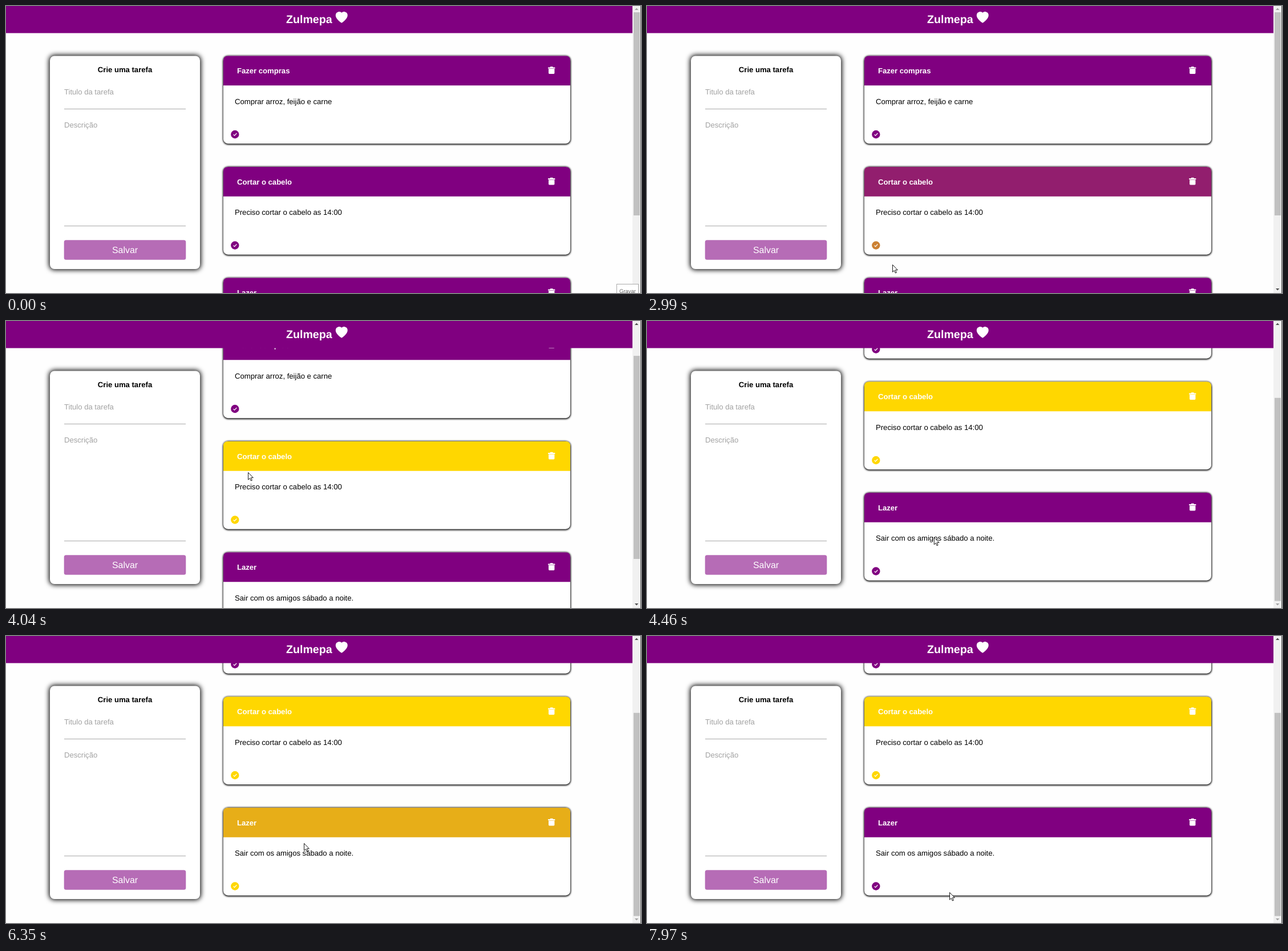
Recreate the animation shown at these times as an HTML page. Size 1113x503 px, loop 8000 ms.

```html
<!DOCTYPE html>
<html lang="pt">
<head>
<meta charset="utf-8">
<style>
  html, body { margin: 0; width: 100%; height: 100%; overflow: hidden; background: #fefefe; }
  svg { display: block; }
  text { font: 13.1px "Liberation Sans", Arial, sans-serif; text-rendering: geometricPrecision; }
  .bold { font-weight: bold; }
  .hint { fill: #a2a2a2; }
  .white { fill: #fff; }
  .glow { filter: blur(4px); }
  .shade { filter: blur(1.8px); }
</style>
</head>
<body>
<svg width="1113" height="503" viewBox="0 0 1113 503">
  <defs>
    <path id="trash" class="white" d="M950 108.3q0-.8.8-.8h2.6l.8-1.2h4l.8 1.2h2.6q.8 0 .8.8v1.1h-12.4zM951 110h10.4v7.6q0 1.4-1.4 1.4h-7.6q-1.4 0-1.4-1.4z"/>
  </defs>
  <g id="list"></g>

  <rect width="1098" height="47.5" fill="purple"/>
  <text x="491" y="30" class="bold white" style="font-size:19.6px">Zulmepa</text>
  <path class="white" transform="translate(577.8 10) scale(1.31)" d="M8 1.3C12.4-3.2 23.5 4.7 8 15-7.5 4.7 3.6-3.2 8 1.3z"/>

  <rect class="glow" x="75.5" y="86" width="266" height="376.5" rx="9"/>
  <rect class="white" x="77" y="87.5" width="263" height="373.5" rx="8"/>
  <text x="208.5" y="115.7" class="bold" text-anchor="middle">Crie uma tarefa</text>
  <text x="102" y="155" class="hint">Titulo da tarefa</text>
  <text x="102" y="212.5" class="hint">Descrição</text>
  <path d="M102 180.5H315M102 385.5H315" stroke="#a9a9a9"/>
  <rect x="101.7" y="410.2" width="213.6" height="34.5" rx="3.5" fill="#b66cb6"/>
  <text x="208.5" y="432.7" class="white" text-anchor="middle" style="font-size:15.9px">Salvar</text>

  <rect x="1098" width="14" height="503" fill="#f1f1f1"/>
  <rect x="1112" width="1" height="503" fill="#555"/>
  <rect id="thumb" x="1100" width="11" height="356" fill="#c1c1c1"/>
  <path id="up" d="M1102 7l3.2-3.5 3.2 3.5z"/>
  <path id="down" d="M1102 495l3.2 3.5 3.2-3.5z"/>

  <g id="tip">
    <rect x="1070.5" y="487.5" width="38" height="18" fill="#fff" stroke="#aaa"/>
    <text x="1075" y="502.5" fill="#666" style="font-size:9.5px">Gravar</text>
  </g>

  <g id="cursor" fill="#fff" stroke="#000" stroke-linejoin="round">
    <path id="arrow" d="M.5.5V13.2L3.4 10.5 5.3 15 7.3 14.2 5.4 9.7H9.3Z" stroke-width=".9"/>
    <path id="hand" d="M-1.5 11V2Q-1.5.5 0 .5T1.5 2V7Q3.8 5.8 4.3 7.5 6.2 6.8 6.7 8.3 8.5 8 8.5 10V13Q8.5 15.5 7 17V19H-1V17.5Q-3 15.5-4.5 12.8-6 10.5-5 9.7-3.7 9-1.5 11.5ZM1.5 7V10M4.3 7.5V10.5M6.7 8.3V10.8"/>
  </g>
</svg>
<script>
const LOOP = 8000, NOTCH = 71, MAX_SCROLL = 175.5, PITCH = 194.5;
const CHECK_X = 401.3, CHECK_Y = 225;
const $ = id => document.getElementById(id);
const set = (id, name, value) => $(id).setAttribute(name, value);

const cards = [
  ["Fazer compras", "Comprar arroz, feijão e carne"],
  ["Cortar o cabelo", "Preciso cortar o cabelo as 14:00"],
  ["Lazer", "Sair com os amigos sábado a noite."]
];
$("list").innerHTML = cards.map(([title, body], i) => `
  <g transform="translate(0 ${i * PITCH})">
    <rect class="shade" x="380.2" y="86.9" width="609.8" height="156" rx="9"/>
    <rect class="white" x="381" y="87.5" width="608" height="153.7" rx="8"/>
    <path id="head${i}" d="M381 139.2V95.5q0-8 8-8H981q8 0 8 8V139.2Z"/>
    <text x="405" y="118.3" class="bold white">${title}</text>
    <use href="#trash"/>
    <text x="401" y="171.5">${body}</text>
    <circle id="check${i}" cx="${CHECK_X}" cy="${CHECK_Y}" r="7.2"/>
    <path d="M398.5 225.2l2 2 3.8-4.2" fill="none" stroke="#fff" stroke-width="1.2"/>
  </g>`).join("");

// Eased 0 to 1 between two times.
function ramp(t, from, to) {
  const f = Math.min(1, Math.max(0, (t - from) / (to - from)));
  return f * f * (3 - 2 * f);
}
const fade = (t, from) => ramp(t, from, from + 300);

// The bend bows a move downwards at its middle.
const entry = { x: 1084, y: 478 };
const moves = [
  { from: 320, to: 1080, x: 399, y: 424, bend: -223 },
  { from: 2160, to: 2860, x: 430, y: 453 },
  { from: 3410, to: 4040, x: 424, y: 265 },
  { from: 4040, to: 4670, x: 530, y: 418 },
  { from: 4670, to: 5230, x: 402, y: 438 },
  { from: 5570, to: 6350, x: 522, y: 363, bend: 42 },
  { from: 6410, to: 7030, x: 402, y: 441 },
  { from: 7360, to: 7970, x: 530, y: 449, bend: 28 }
];

function pointerAt(t) {
  let { x, y } = entry;
  for (const m of moves) {
    const f = ramp(t, m.from, m.to);
    x += (m.x - x) * f;
    y += (m.y - y) * f + (m.bend || 0) * 4 * f * (1 - f);
  }
  return [x, y];
}

function scrollAt(t) {
  const notches = [3780, 4170, 4320].reduce((sum, at) => sum + ramp(t, at, at + 140), 0);
  return Math.min(MAX_SCROLL, NOTCH * notches);
}

function paint(i, head, check) {
  const tint = f => `rgb(${128 + 127 * f},${215 * f},${128 - 128 * f})`;
  set("head" + i, "fill", tint(head));
  set("check" + i, "fill", tint(check));
}

function draw(t) {
  const offset = scrollAt(t);
  const arrowColor = active => active ? "#505050" : "#a3a3a3";
  set("list", "transform", `translate(0 ${-offset})`);
  set("thumb", "y", 11 + offset * .705);
  set("up", "fill", arrowColor(offset > 0));
  set("down", "fill", arrowColor(offset < MAX_SCROLL));

  // The second check dims after hover until its card turns gold.
  const dim = .4 * (ramp(t, 2740, 2990) - ramp(t, 2990, 3250));
  paint(0, 0, 0);
  paint(1, fade(t, 2920), fade(t, 1000) - dim);
  paint(2, fade(t, 6135) - fade(t, 7540), fade(t, 5130) - fade(t, 7540));

  set("tip", "opacity", t < 70 ? 1 : t < 130 ? .5 : 0);

  const [x, y] = pointerAt(t);
  const isHand = cards.some((_, i) =>
    Math.hypot(x - CHECK_X, y - CHECK_Y - i * PITCH + offset) < 8);
  set("cursor", "transform", `translate(${x} ${y})`);
  set("cursor", "opacity", t < 320 ? 0 : 1);
  set("hand", "opacity", isHand ? 1 : 0);
  set("arrow", "opacity", isHand ? 0 : 1);
}

const start = performance.now();
function tick() {
  draw((performance.now() - start) % LOOP);
  requestAnimationFrame(tick);
}
tick();
</script>
</body>
</html>
```
